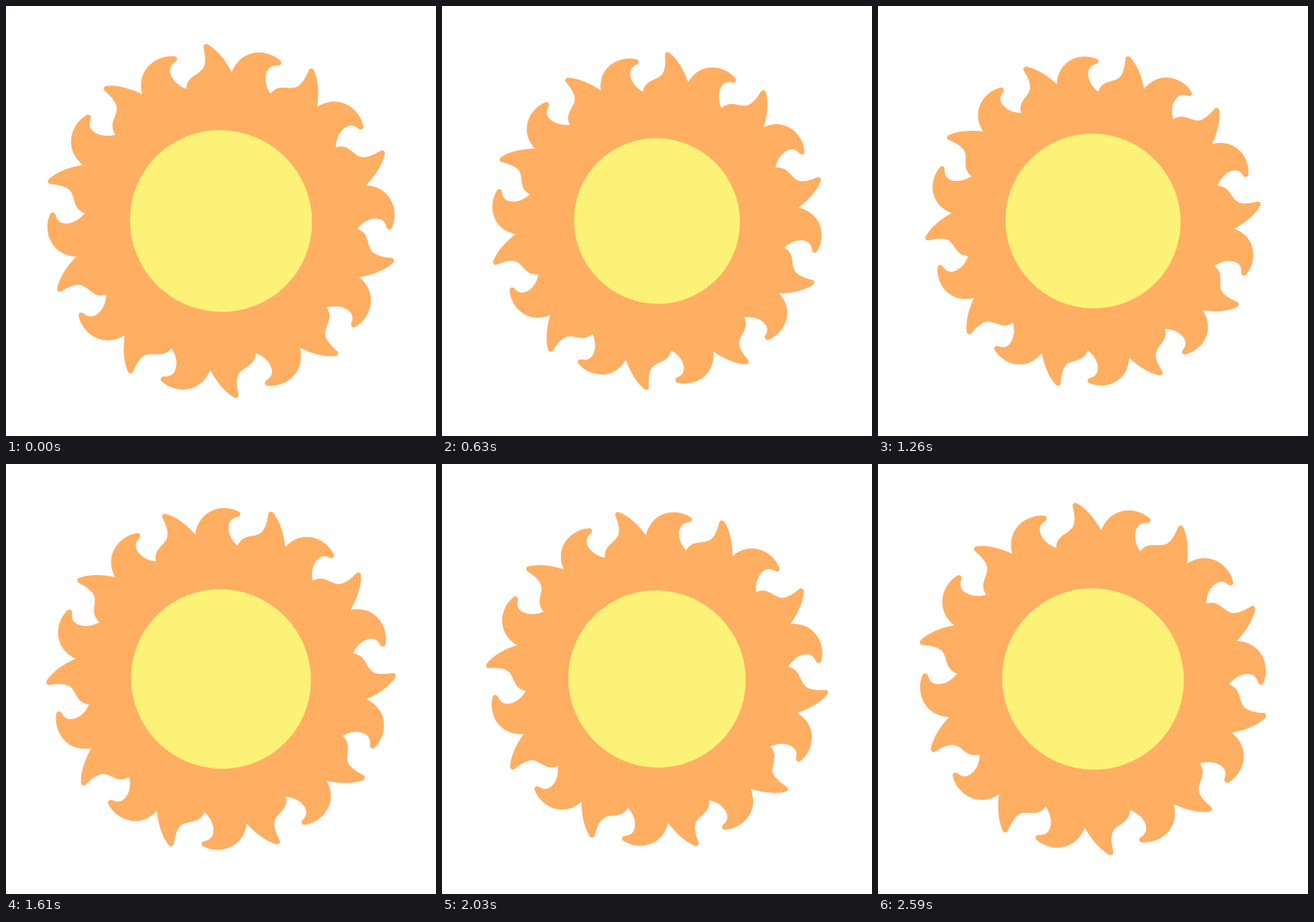
An HTML page with a canvas for the animation above (2620 ms loop, 600 px wide and 600 px high).

```html
<!DOCTYPE html>
<html lang="en">
<head>
<meta charset="utf-8">
<title>Pulsing sun</title>
<style>
  html, body { margin: 0; width: 100%; height: 100%; overflow: hidden; background: #fff; }
  canvas { display: block; }
</style>
</head>
<body>
<canvas id="stage" width="600" height="600"></canvas>
<script>
const ctx = document.getElementById('stage').getContext('2d');
const LOOP = 2620, STEP = 70, STEPS = 38, BEATS = 3, PAIRS = 10;
const TAU = 2 * Math.PI;

function placed(angle, scale, color, trace) {
  ctx.save();
  ctx.translate(300, 300);
  ctx.rotate(angle);
  ctx.scale(scale, scale);
  ctx.fillStyle = ctx.strokeStyle = color;
  ctx.beginPath();
  trace();
  ctx.closePath();
  ctx.fill();
  ctx.restore();
}

// A pointed flame and a curled one, repeated around the centre;
// the wide round stroke softens the tips and keeps the notches sharp.
function rays() {
  ctx.moveTo(-44.4, -178.5);
  for (let i = 0; i < PAIRS; i++) {
    ctx.bezierCurveTo(-48, -212, -8, -190, -20.5, -243);
    ctx.quadraticCurveTo(0, -231, 16, -197);
    ctx.bezierCurveTo(24, -236, 61, -238, 80, -221);
    ctx.bezierCurveTo(58, -223, 50, -196, 69, -170.5);
    ctx.rotate(TAU / PAIRS);
  }
  ctx.closePath();
  ctx.lineWidth = 8;
  ctx.lineJoin = 'round';
  ctx.stroke();
}

// A circle drawn slightly longer along one diagonal.
function disc() {
  ctx.ellipse(0, 0, 127.7, 126.3, TAU / 9, 0, TAU);
}

function draw(now) {
  const step = Math.floor(now % LOOP / STEP);
  const phase = step * BEATS / STEPS;
  const dip = (1 - Math.cos(TAU * phase)) / 2;
  const firstBeat = phase < 1;
  const turn = TAU / PAIRS * step / STEPS;

  ctx.fillStyle = '#fff';
  ctx.fillRect(0, 0, 600, 600);
  placed(turn, 1 - (firstBeat ? 0.077 : 0.055) * dip, '#ffae62', rays);
  placed(0, 1 - (firstBeat ? 0.143 : 0.041) * dip, '#fdf278', disc);
}

const start = performance.now();
function tick() {
  draw(performance.now() - start);
  requestAnimationFrame(tick);
}
tick();
</script>
</body>
</html>
```
